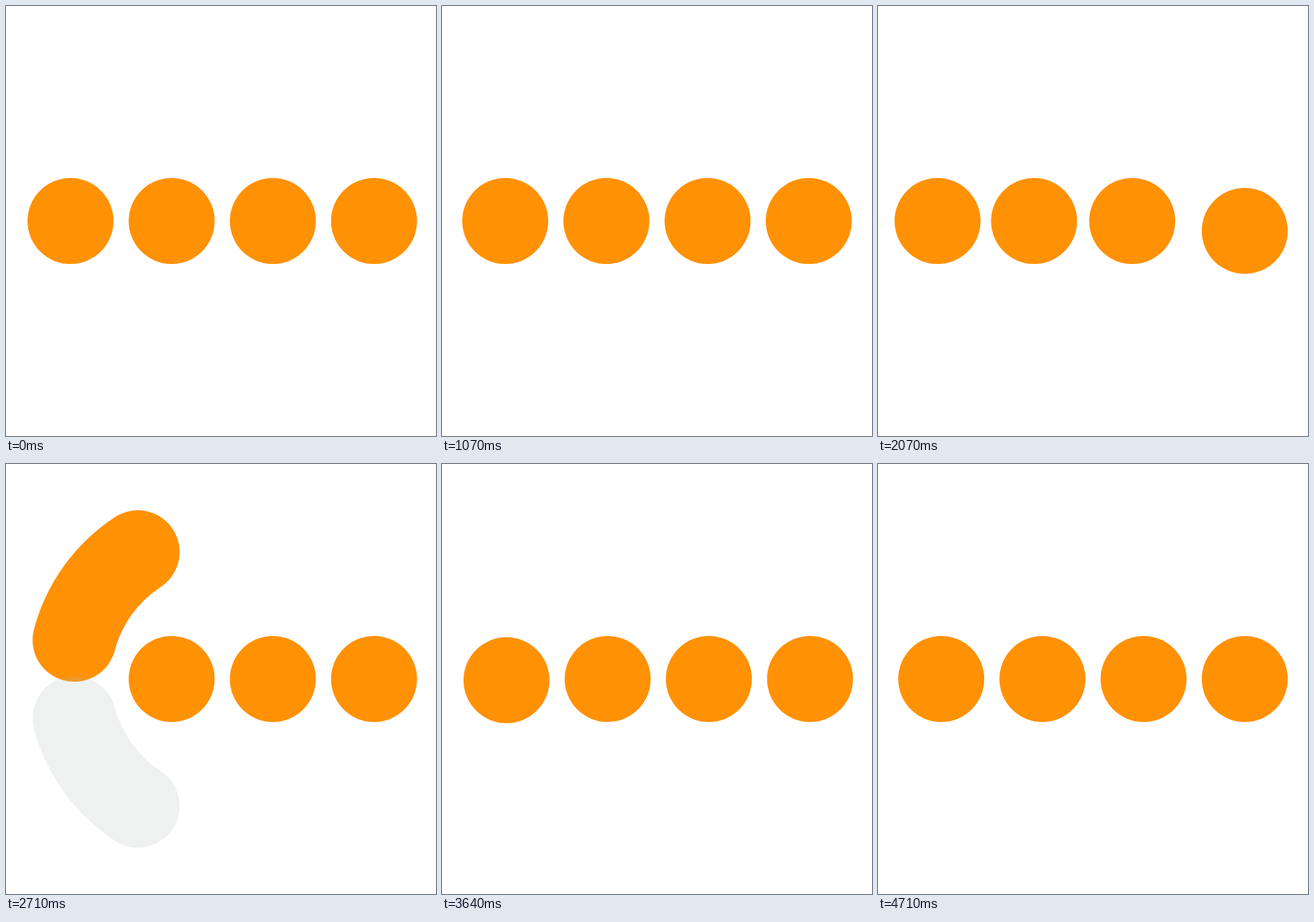
Write an HTML page that moves like this. It is 640 px wide and 640 px high and loops after 4780 ms.

```html
<!DOCTYPE html>
<html lang="en">
<head>
<meta charset="utf-8">
<title>Hopping dots loader</title>
<style>
  html, body { margin: 0; width: 100%; height: 100%; overflow: hidden; background: #fff; }
  svg { display: block; width: 100vw; height: 100vh; }
  circle { fill: #ff9105; }
  path { fill: none; stroke-width: 66; stroke-linecap: round; }
  #worm { stroke: #ff9105; }
  #shade { stroke: rgb(175 185 180 / .2); }
</style>
</head>
<body>
<svg viewBox="0 0 340 340">
  <path id="worm" pathLength="194.32" d="M50 185V170A120 120 0 0 1 290 170V185"/>
  <path id="shade" pathLength="180" d="M50 170A120 120 0 0 0 290 170"/>
  <circle r="34" cy="170"/>
  <circle r="34" cy="170"/>
  <circle r="34" cy="170"/>
  <circle r="34" cy="170"/>
</svg>
<script>
const LOOP = 4780, CYCLE = 1200, FPS = 14, TICK = 40;
const LEG = 7.16; // straight run below each end of the arc, in degrees
const TAKEOFF = 200, LANDING = 800;

// Smooth monotone curve through [time, value] points
function curve(points) {
  const n = points.length;
  const slope = i => (points[i + 1][1] - points[i][1]) / (points[i + 1][0] - points[i][0]);
  const tangent = points.map((_, i) => {
    if (i === 0) return slope(0);
    if (i === n - 1) return slope(n - 2);
    const a = slope(i - 1), b = slope(i);
    return a * b > 0 ? 2 * a * b / (a + b) : 0;
  });
  return t => {
    if (t <= points[0][0]) return points[0][1];
    if (t >= points[n - 1][0]) return points[n - 1][1];
    const i = points.findIndex(p => p[0] > t) - 1;
    const [t0, v0] = points[i], [t1, v1] = points[i + 1];
    const h = t1 - t0, u = (t - t0) / h, w = 1 - u;
    return v0 * w * w * (1 + 2 * u) + v1 * u * u * (3 - 2 * u)
      + h * u * w * (w * tangent[i] - u * tangent[i + 1]);
  };
}

const lead = curve([[200, -LEG], [240, 5], [280, 29], [320, 56.8], [400, 105],
  [480, 138.6], [560, 161.2], [600, 167], [680, 175], [760, 180]]);
const tail = curve([[200, -LEG], [240, -4], [280, 4], [320, 14.9], [400, 29],
  [480, 50.1], [560, 103.2], [600, 125.7], [640, 145], [680, 160], [720, 170], [800, 180]]);
const shift = curve([[0, 0], [10, 6], [30, 31.5], [70, 57], [90, 66], [130, 78], [210, 87],
  [250, 89], [290, 90], [330, 88.7], [390, 85], [450, 82], [480, 81]]);
const settle = curve([[800, 0], [840, 5], [880, 7.8], [920, 5], [960, 1], [990, 0]]);
const crouch = p => {
  const u = Math.min(1, Math.max(0, (p - 40) / 160));
  return 15 * (u < .5 ? 4 * u ** 3 : 1 - 4 * (1 - u) ** 3);
};

const worm = document.getElementById('worm');
const shade = document.getElementById('shade');
const dots = [...document.querySelectorAll('circle')];

const show = (el, on) => el.setAttribute('visibility', on ? 'visible' : 'hidden');
function dash(el, from, to) {
  el.setAttribute('stroke-dasharray', `${Math.max(.01, to - from)} 999`);
  el.setAttribute('stroke-dashoffset', -from);
}

function draw(p) {
  const flying = p > TAKEOFF && p < LANDING;
  const a = tail(p), b = lead(p);
  show(worm, flying);
  show(shade, flying && b > 0);
  show(dots[0], !flying);
  dash(worm, a + LEG, b + LEG);
  dash(shade, Math.max(0, a), Math.max(0, b));

  const landed = p >= LANDING;
  dots[0].setAttribute('cx', landed ? 290 : 51);
  dots[0].setAttribute('cy', 170 + (landed ? settle(p) : crouch(p)));
  for (let i = 1; i < 4; i++) {
    dots[i].setAttribute('cx', 51 + 80 * i - shift(p - 410 - 60 * i));
  }
}

// Stepped playback: 14 pictures a second, each holding a pose from a 40 ms grid
function phase(t) {
  const k = Math.floor((t + 5) * FPS / 1000);
  const held = Math.round(k * 100 / FPS) * 10;
  return (Math.floor(held / TICK) + 1) * TICK % CYCLE;
}

const start = performance.now();
function tick() {
  draw(phase((performance.now() - start) % LOOP));
  requestAnimationFrame(tick);
}
tick();
</script>
</body>
</html>
```
